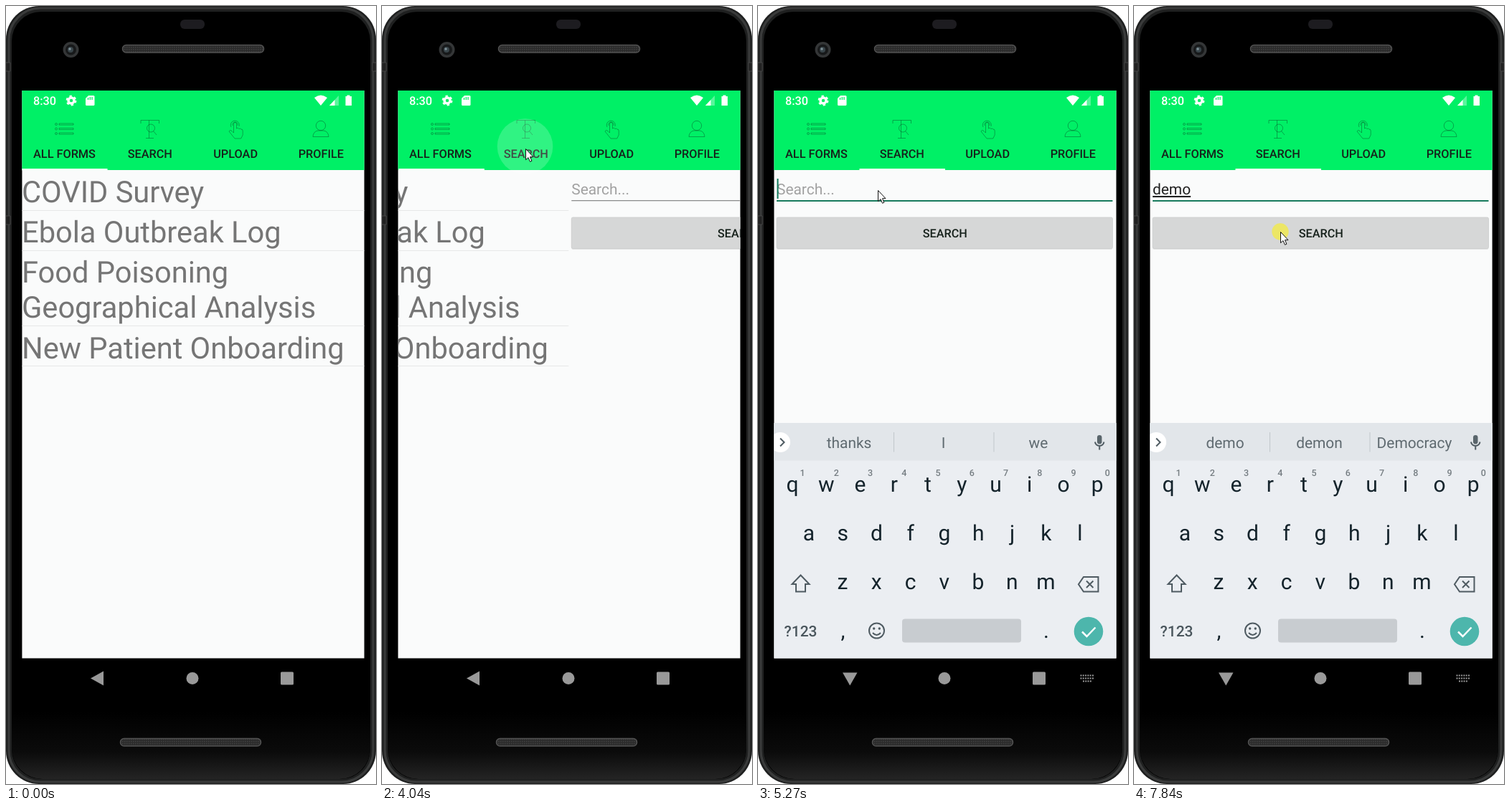
An HTML page for the animation above (8000 ms loop, 516 px wide and 1086 px high).

```html
<!DOCTYPE html>
<html lang="en">
<head>
<meta charset="utf-8">
<title>Form search</title>
<style>
html, body { margin: 0; width: 100%; height: 100%; overflow: hidden; background: #fff; }
#stage { display: block; width: 100vw; height: 100vh; }
text { font-family: Roboto, sans-serif; text-rendering: geometricPrecision; }
.mid { text-anchor: middle; }
.label { font-size: 16.27px; font-weight: 500; fill: #16211b; }
.row { font-size: 41.6px; fill: #757575; }
.field { font-size: 20.9px; }
.word { font-size: 20.9px; fill: #5f6a70; }
.key { font-size: 30px; fill: #14232b; }
.hint { font-size: 12.5px; font-weight: 500; fill: #757d82; }
.line { fill: none; stroke: #0a4a28; stroke-width: .6; stroke-opacity: .75; }
.glyph { fill: none; stroke: #4f5b62; stroke-width: 2; }
#typed { fill: #222; text-decoration: underline; text-decoration-skip-ink: none; }
</style>
</head>
<body>
<svg id="stage" viewBox="0 0 516 1086">
  <defs>
    <linearGradient id="chin" x2="0" y2="1">
      <stop offset="0"/><stop offset=".6" stop-color="#0b0b0b"/><stop offset="1" stop-color="#242424"/>
    </linearGradient>
    <pattern id="mesh" width="3" height="3" patternUnits="userSpaceOnUse">
      <rect width="3" height="3" fill="#2b2b2b"/><rect width="1.5" height="1.5" fill="#414141"/>
    </pattern>
  </defs>

  <!-- phone body -->
  <rect width="516" height="1086" rx="46" fill="#1f2020"/>
  <rect x="4" y="3" width="508" height="1080" rx="44" fill="none" stroke="#3a3b3b" stroke-width="3"/>
  <rect x="8" y="8" width="500" height="1071" rx="41"/>
  <path d="M8 985H508V1036a43 43 0 0 1-43 43H51a43 43 0 0 1-43-43Z" fill="url(#chin)"/>
  <path d="M0 79H6V91H0M0 293H6V305H0M516 79H511V91H516" fill="#222" stroke="#444"/>
  <rect x="243" y="19" width="34" height="13" rx="6" fill="#1d1c20"/>
  <circle cx="90.500" cy="61" r="11" fill="#343637"/>
  <circle cx="90.500" cy="61" r="7.500" fill="#17191a"/>
  <circle cx="90" cy="61" r="4" fill="#39454a"/>
  <circle cx="89" cy="60" r="1.700" fill="#82939a"/>
  <g fill="url(#mesh)" stroke="#515151" stroke-width="1.500">
    <rect x="162.500" y="54.500" width="197" height="10.500" rx="5"/>
    <rect x="159.500" y="1022.500" width="196" height="10.500" rx="5"/>
  </g>

  <!-- navigation bar -->
  <g fill="#999">
    <path id="back" d="M118 938.500 136 928.500V948.500Z"/>
    <path id="down" d="M118 930.500H138.500L128.250 948.500Z"/>
    <circle cx="260" cy="938.500" r="8.500"/>
    <rect x="383" y="929.500" width="18" height="18" rx="1.500"/>
    <path id="ime" d="M449.500 934.500H468M449.500 938.500H468M453 942.500H465" stroke="#999" stroke-width="2" stroke-dasharray="2 1.300"/>
  </g>

  <svg x="22.400" y="118" width="477.200" height="792.500" viewBox="22.400 118 477.200 792.500">
    <rect x="22" y="118" width="478" height="793" fill="#fafbfb"/>
    <g id="pages">
      <g id="list"></g>
      <g transform="translate(478)">
        <text id="hintText" class="field" x="26" y="263" fill="#a2a2a2">Search...</text>
        <text id="typed" class="field" x="26" y="263"></text>
        <rect id="rule" x="26" width="468.500"/>
        <rect id="caret" y="241" width="2" height="28" fill="#0f7a5b"/>
        <rect x="26" y="296" width="468.500" height="44" rx="2.500" fill="#000" opacity=".1"/>
        <rect x="26" y="295" width="468.500" height="43.500" rx="2" fill="#d6d7d7" stroke="#c9caca" stroke-width=".7"/>
        <text class="label mid" x="260.750" y="322.500">SEARCH</text>
      </g>
    </g>

    <!-- header -->
    <rect x="22" y="118" width="478" height="111" fill="#00f066"/>
    <text class="label" x="38" y="138" style="fill:#fff">8:30</text>
    <g fill="#fff">
      <circle cx="91" cy="132" r="4" fill="none" stroke="#fff" stroke-width="3.500"/>
      <circle cx="91" cy="132" r="6.300" fill="none" stroke="#fff" stroke-width="2.200" stroke-dasharray="3.300"/>
      <path d="M115 125H122a1.500 1.500 0 0 1 1.500 1.500V137.500a1.500 1.500 0 0 1-1.500 1.500H112.500a1.500 1.500 0 0 1-1.500-1.500V129Z"/>
      <path d="M114.500 128V131M117.300 127V131M120 127V131" stroke="#00f066" stroke-width="1.300"/>
      <path d="M430 128Q439 121 448 128L439 139Z"/>
      <path d="M464 125V139H451Z" opacity=".35"/>
      <path d="M458.500 131V139H451Z"/>
      <path d="M475.500 124.500H479.500V126H482V139H473.500V126H475.500Z"/>
    </g>
    <g class="line">
      <path d="M74 164H94V166H74ZM74 170.500H94V172.500H74ZM74 177H94V179H74Z"/>
      <circle cx="70" cy="165" r="1.500"/><circle cx="70" cy="171.500" r="1.500"/><circle cx="70" cy="178" r="1.500"/>
      <path d="M188 164V159.500H213.500V164M199.500 159.500V184.500M195 184.500H206M205.500 174.500 210 180"/>
      <circle cx="202" cy="170.500" r="5.500"/>
      <path d="M317.500 177V164.500a2 2 0 0 1 4 0V171q2-2 3.500.5 2-1.500 3 .7 2-.7 2.200 2V180l-2.500 5H319L311 175q1-3 4-.5l2.500 2.500"/>
      <path d="M314 169a6 6 0 1 1 11-1M316 167a3.700 3.700 0 1 1 7 0"/>
      <circle cx="439" cy="167" r="6.700"/>
      <path d="M428 182.500Q428.500 175 435 174H443Q449.500 175 450 182.500Z"/>
    </g>
    <g id="tabs"></g>
    <circle id="ripple" cx="199.500" cy="196" fill="#fff"/>
    <rect id="tabMark" x="22" y="227" width="119.500" height="2.500" fill="#fff"/>

    <!-- keyboard -->
    <g id="keyboard">
      <rect x="22" y="582" width="478" height="330" fill="#ebeef2"/>
      <rect x="22" y="582" width="478" height="52.500" fill="#e2e6ea"/>
      <path d="M189.500 595V622.500M329 595V622.500" stroke="#c1c7cb"/>
      <circle cx="31" cy="609" r="14" fill="#fff"/>
      <path class="glyph" d="M31 603.500 36.500 609 31 614.500"/>
      <g id="words"></g>
      <rect x="473" y="599" width="6.500" height="12.500" rx="3.250" fill="#59656b"/>
      <path class="glyph" d="M470 608.500a6.300 6.300 0 0 0 12.500 0M476.250 615V619.500" stroke-width="1.700"/>
      <g id="keys"></g>
      <path class="glyph" d="M59.500 794.500 47.500 807H53V817.500H66V807H71.500Z"/>
      <path class="glyph" d="M454 797H474.500V817.500H454L447 807.250ZM458 802.500 467.500 812M467.500 802.500 458 812"/>
      <circle class="glyph" cx="165.500" cy="872" r="10.500"/>
      <path class="glyph" d="M160 875q5.500 6 11 0"/>
      <circle cx="161.700" cy="869" r="1.700" fill="#4f5b62"/><circle cx="169.300" cy="869" r="1.700" fill="#4f5b62"/>
      <rect x="201" y="855.500" width="166" height="33" rx="4" fill="#c8ccd0"/>
      <circle cx="461" cy="873" r="20.300" fill="#4db6ac"/>
      <path d="M452 873.500 458.500 880 470.500 867.500" fill="none" stroke="#fff" stroke-width="2.500"/>
    </g>
  </svg>

  <g id="mouse">
    <circle id="press" r="11.700" fill="#eee75c" opacity=".92"/>
    <path d="M.5.5V15.700L4 12.600 6.500 18.300 8.900 17.300 6.500 11.700H11Z" fill="#fff" stroke="#111" stroke-width="1"/>
  </g>
</svg>
<script>
const LOOP = 8000;
const $ = id => document.getElementById(id);
const set = (el, attrs) => { for (const k in attrs) el.setAttribute(k, attrs[k]); return el; };
const show = (id, on) => set($(id), { visibility: on ? 'visible' : 'hidden' });
const add = (parent, tag, attrs, text = '') => {
  const el = set(document.createElementNS('http://www.w3.org/2000/svg', tag), attrs);
  el.textContent = text;
  return $(parent).appendChild(el);
};
const label = (parent, cls, x, y, text) => add(parent, 'text', { class: cls, x, y }, text);
const clamp = v => Math.max(0, Math.min(1, v));

// The screen refreshes in bursts: [first, last, count]
const ticks = [
  [0, 0, 1], [690, 840, 3], [1010, 1010, 1], [1310, 2100, 11], [2250, 2630, 6], [3810, 3810, 1],
  [3960, 4420, 7], [4650, 4880, 4], [5120, 5270, 3], [5370, 5370, 1], [5670, 5670, 1],
  [5900, 5970, 2], [6200, 6280, 2], [6750, 6750, 1], [6990, 7070, 2], [7440, 7840, 6]
].flatMap(([a, b, n]) =>
  Array.from({ length: n }, (_, i) => Math.round((a + (b - a) * i / Math.max(1, n - 1)) / 10) * 10));

// Pointer path: [time, x, y]
const path = [
  [690, 294, 652], [765, 262, 651], [840, 239, 654], [1010, 238, 654], [1310, 233, 632],
  [1500, 185, 540], [1700, 125, 430], [1850, 104, 335], [2000, 113, 262], [2100, 126, 232],
  [2250, 131, 229], [2630, 200, 199], [4110, 200, 199], [4420, 169, 250], [4650, 167, 257],
  [7360, 167, 257], [7760, 204, 315]
];

// Edits: [time, field text, suggestions]
const edits = [
  [4880, '', 'thanks,I,we'], [5670, 'd', 'd,do,do'], [5900, 'de', 'de,dear,deal'],
  [5970, 'dem', 'dem,demo,demand'], [6200, 'demo', 'demo,demon,Democracy'],
  [6280, 'demop', 'demop,demon,demos'], [6990, 'demo', 'demo,demon,Democracy']
];

[['COVID Survey', 274], ['Ebola Outbreak Log', 330], ['Food Poisoning', 386],
  ['Geographical Analysis', 435], ['New Patient Onboarding', 492]]
  .forEach(([text, y]) => label('list', 'row', 22, y, text));
[285, 341, 446, 502].forEach(y => add('list', 'rect', { x: 22, y, width: 478, height: 1, fill: '#e7e8e8' }));
['ALL FORMS', 'SEARCH', 'UPLOAD', 'PROFILE'].forEach((t, i) => label('tabs', 'label mid', 81.5 + i * 119.3, 212, t));

const STEP = 47.25;
[['qwertyuiop', 48, 678], ['asdfghjkl', 71, 746], ['zxcvbnm', 118, 814]].forEach(([row, x, y]) =>
  [...row].forEach((c, i) => label('keys', 'key mid', x + i * STEP, y, c)));
[...'1234567890'].forEach((c, i) => label('keys', 'hint mid', 62 + i * STEP, 656, c));
label('keys', 'key mid', 118.5, 882, ',');
label('keys', 'key mid', 402, 882, '.');
set(label('keys', 'word mid', 59.5, 879.5, '?123'), { style: 'fill:#4a565d;font-weight:500' });
const words = [127, 258.5, 391].map(x => label('words', 'word mid', x, 617, ''));

function pointer(t) {
  const i = path.findIndex(p => p[0] > t);
  if (i < 0) return path[path.length - 1].slice(1);
  if (i === 0) return path[0].slice(1);
  const [a, b] = [path[i - 1], path[i]];
  const k = (t - a[0]) / (b[0] - a[0]);
  return [a[1] + (b[1] - a[1]) * k, a[2] + (b[2] - a[2]) * k];
}

function draw(t) {
  const [x, y] = pointer(t);
  show('mouse', t >= 690);
  set($('mouse'), { transform: `translate(${x} ${y})` });
  const pressed = [[3810, 3960], [4720, 4800], [7840, LOOP]].some(([a, b]) => t >= a && t < b);
  set($('press'), { opacity: pressed ? .92 : 0 });

  const slide = 1 - (1 - clamp((t - 3988) / 400)) ** 5;
  set($('pages'), { transform: `translate(${-478 * slide})` });
  const k = clamp((t - 4020) / 330);
  set($('tabMark'), { x: 22 + 119.5 * k * k * (3 - 2 * k) });
  set($('ripple'), {
    r: Math.min(50, 20 + Math.max(0, t - 3960) * .235),
    opacity: t < 3960 ? 0 : .19 * (1 - clamp((t - 4150) / 250))
  });

  const focus = t >= 4880;
  const [at, text, hints] = edits.filter(e => e[0] <= t).pop() || edits[0];
  show('hintText', !text);
  $('typed').textContent = text;
  set($('rule'), { y: 271, height: focus ? 2 : 1.3, fill: focus ? '#177a5c' : '#8b8c8c' });
  show('caret', focus && t - at < 460);
  set($('caret'), { x: 26.5 + (text ? $('typed').getComputedTextLength() : 0) });
  hints.split(',').forEach((w, i) => words[i].textContent = w);

  const typing = t >= 5120;
  show('keyboard', typing);
  set($('keyboard'), { transform: `translate(0 ${330 * (1 - clamp((t - 5070) / 200)) ** 2})` });
  show('back', !typing);
  show('down', typing);
  show('ime', typing);
}

const start = performance.now();
function frame() {
  const now = (performance.now() - start) % LOOP;
  draw(ticks.filter(v => v <= now).pop());
  requestAnimationFrame(frame);
}
frame();
</script>
</body>
</html>
```
